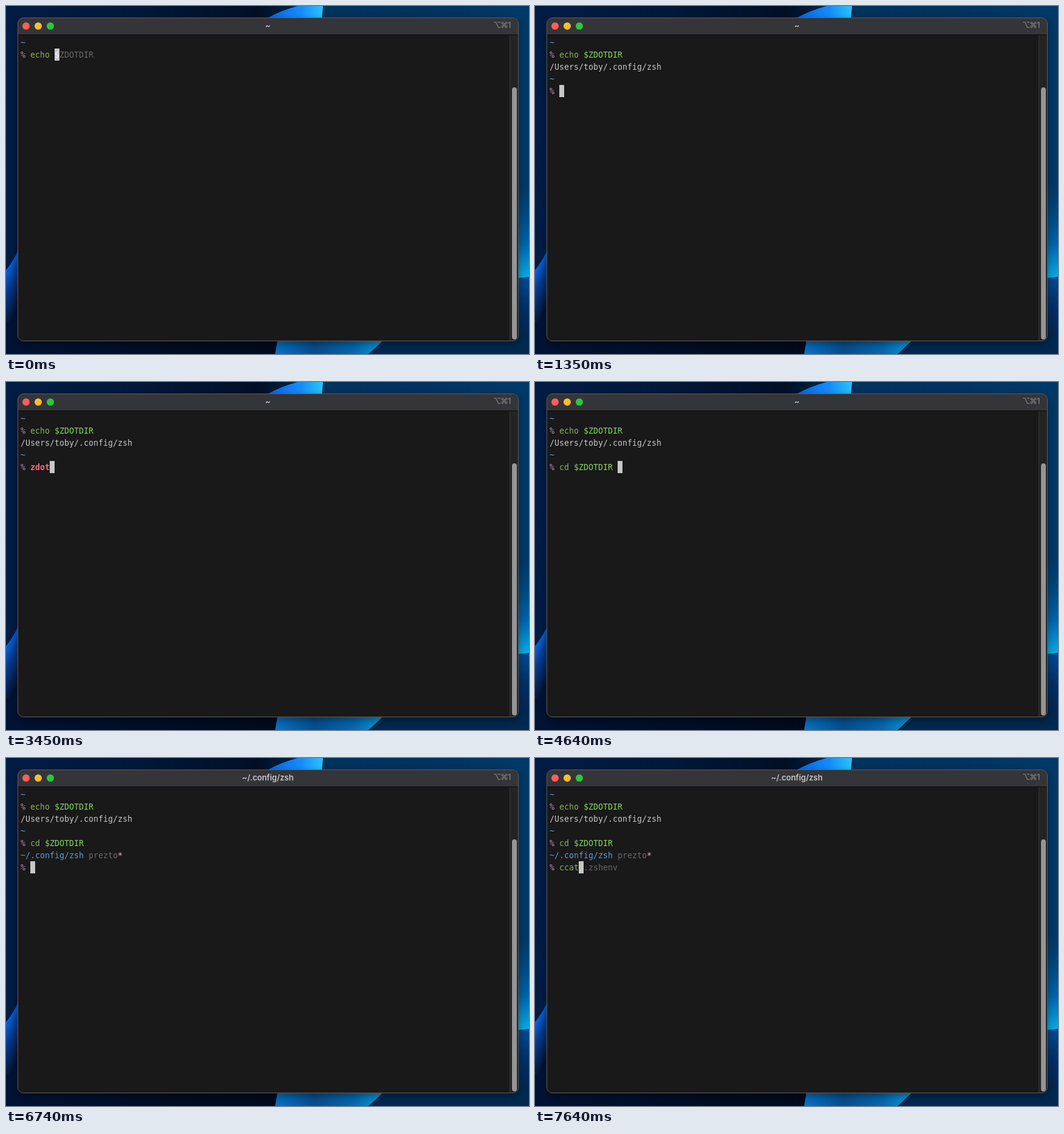
Write an HTML page that moves like this. It is 861 px wide and 573 px high and loops after 8000 ms.

```html
<!DOCTYPE html>
<html lang="en">
<head>
<meta charset="utf-8">
<title>Terminal session</title>
<style>
  html, body { margin: 0; width: 100%; height: 100%; overflow: hidden; background: #011a3c; }
  svg { display: block; width: 861px; height: 573px; }
  text { white-space: pre; }
  #screen { font: 13.29px "DejaVu Sans Mono", "Liberation Mono", monospace; }
  .bar { font: 600 13px Inter, "DejaVu Sans", sans-serif; }
  .path { fill: #5b9bd5; }
  .prompt { fill: #c08fbd; }
  .cmd { fill: #8aae62; }
  .var { fill: #83d75f; }
  .out { fill: #c7c7c7; }
  .hint { fill: #686868; }
  .bad { fill: #ff6b80; font-weight: bold; }
  .star { fill: #ffafd7; }
  .under { fill: #f6f6f6; }
</style>
</head>
<body>
<svg viewBox="0 0 861 573" xmlns="http://www.w3.org/2000/svg">
  <defs>
    <linearGradient id="base">
      <stop offset="0" stop-color="#011c45"/>
      <stop offset=".25" stop-color="#01183a"/>
      <stop offset=".48" stop-color="#000f26"/>
      <stop offset=".61" stop-color="#00325c"/>
      <stop offset=".8" stop-color="#00335f"/>
      <stop offset="1" stop-color="#003968"/>
    </linearGradient>
    <linearGradient id="topPetal">
      <stop offset="0" stop-color="#0a63e6"/>
      <stop offset=".6" stop-color="#148df8"/>
      <stop offset="1" stop-color="#2cc4fb"/>
    </linearGradient>
    <linearGradient id="leftPetal" x1="0" y1="0" x2=".35" y2="1">
      <stop offset="0" stop-color="#1592ff"/>
      <stop offset=".2" stop-color="#0a6cf0"/>
      <stop offset=".5" stop-color="#043f96"/>
      <stop offset="1" stop-color="#00122f"/>
    </linearGradient>
    <linearGradient id="rightPetal" x1="0" y1="0" x2="0" y2="1">
      <stop offset="0" stop-color="#004c86" stop-opacity="0"/>
      <stop offset=".65" stop-color="#0065ad"/>
      <stop offset="1" stop-color="#04aee8"/>
    </linearGradient>
    <linearGradient id="rightLow" x1="0" y1="0" x2="0" y2="1">
      <stop offset="0" stop-color="#014a94"/>
      <stop offset=".4" stop-color="#012f66"/>
      <stop offset="1" stop-color="#012048"/>
    </linearGradient>
    <linearGradient id="bottomPetal">
      <stop offset="0" stop-color="#0872c4"/>
      <stop offset=".35" stop-color="#044f90"/>
      <stop offset=".7" stop-color="#0567ae"/>
      <stop offset="1" stop-color="#0ba5e2"/>
    </linearGradient>
    <linearGradient id="bottomDark">
      <stop offset="0" stop-color="#001334"/>
      <stop offset="1" stop-color="#000a1c"/>
    </linearGradient>
    <filter id="shadow" x="-10%" y="-10%" width="120%" height="125%">
      <feDropShadow dx="0" dy="5" stdDeviation="7" flood-color="#000" flood-opacity=".4"/>
    </filter>
    <clipPath id="frame"><rect x="19.5" y="19.5" width="824" height="532" rx="9.5"/></clipPath>
  </defs>

  <g id="wallpaper">
    <rect width="861" height="573" fill="url(#base)"/>
    <path d="M430 20Q454 7 480 0H522L519 30H430Z" fill="url(#topPetal)"/>
    <path d="M0 435Q10 423 20 403V520H0Z" fill="url(#leftPetal)"/>
    <path d="M843 290H861V446L843 448Z" fill="url(#rightPetal)"/>
    <path d="M843 448L861 446V573H843Z" fill="url(#rightLow)"/>
    <path d="M0 520H20V545H448L443 573H0Z" fill="url(#bottomDark)"/>
    <path d="M448 545H627L597 573H443Z" fill="url(#bottomPetal)"/>
    <path d="M627 545H861V573H597Z" fill="#01284f"/>
  </g>

  <rect x="19" y="19" width="825" height="533" rx="10" fill="#191919" filter="url(#shadow)"/>
  <g clip-path="url(#frame)">
    <rect x="19" y="19" width="825" height="533" fill="#191919"/>
    <rect x="19" y="19" width="825" height="28" fill="#343538"/>
    <rect x="19" y="47" width="825" height="1" fill="#080808"/>
    <rect x="829" y="48" width="15" height="504" fill="#232323"/>
    <rect x="829" y="48" width="1" height="504" fill="#353535"/>
    <rect x="833" y="134" width="8" height="415" rx="4" fill="#959595"/>
  </g>
  <rect x="19.5" y="19.5" width="824" height="532" rx="9.5" fill="none" stroke="#5c5e61"/>

  <circle cx="33" cy="33" r="6" fill="#ff5f57"/>
  <circle cx="53" cy="33" r="6" fill="#febc2e"/>
  <circle cx="73" cy="33" r="6" fill="#28c840"/>
  <circle id="dot" cx="33" cy="33" r="2" fill="#8b1a12"/>
  <text id="title" class="bar" x="431" y="37" text-anchor="middle" fill="#c6c6c7"></text>
  <text class="bar" x="802 814 826" y="36" fill="#77787a">⌥⌘1</text>
  <g id="screen"></g>
</svg>

<script>
const LOOP = 8000, COL = 8, ROW = 20, LEFT = 24, TOP = 50;
const NS = 'http://www.w3.org/2000/svg';
const byId = id => document.getElementById(id);

// A line is a list of [style, text] runs.
const prompt = (...runs) => [['prompt', '% '], ...runs];
const home = [['path', '~']];
const echo = prompt(['cmd', 'echo '], ['var', '$ZDOTDIR']);
const output = [['out', '/Users/toby/.config/zsh']];
const cd = prompt(['cmd', 'cd '], ['var', '$ZDOTDIR']);
const config = [['path', '~/.config/zsh'], ['hint', ' prezto'], ['star', '*']];

const first = [home, echo];
const second = [...first, output, home];
const third = [...second, cd, config];

// Typed text, then the character under the cursor, then the rest of the hint.
const typing = (before, style, typed, hint = '') => ({
  lines: [...before, prompt([style, typed], ['under', hint.slice(0, 1)], ['hint', hint.slice(1)])],
  cursor: [2 + typed.length, before.length]
});
const still = (lines, col, row) => ({ lines, cursor: [col, row] });

const steps = [
  [0, typing([home], 'cmd', 'echo ', '$ZDOTDIR')],
  [750, still(first, 15, 1)],
  [1200, still(first, 0, 2)],
  [1350, typing(second, 'cmd', '')],
  [2850, typing(second, 'bad', 'z', 'z')],
  [3150, typing(second, 'bad', 'zd', 'ot')],
  [3300, typing(second, 'bad', 'zdo', 't')],
  [3450, typing(second, 'bad', 'zdot')],
  [4640, still([...second, cd], 14, 4)],
  [5090, still([...second, cd], 0, 5)],
  [5240, typing(third, 'cmd', '')],
  [6890, typing(third, 'cmd', 'c', 'd $ZDOTDIR')],
  [7040, typing(third, 'cmd', 'cc', 'at .zshenv')],
  [7490, typing(third, 'bad', 'cca', 't .zshenv')],
  [7640, typing(third, 'cmd', 'ccat', ' .zshenv')]
];
const titles = [[0, '~'], [5090, '~/.config/zsh (-zsh)'], [5240, '~/.config/zsh']];
const dots = [[0, 'hidden'], [5990, 'visible'], [6740, 'hidden']];

const at = (table, t) => table.findLast(([start]) => start <= t)[1];

function add(tag, attrs, text = '') {
  const el = document.createElementNS(NS, tag);
  for (const key in attrs) el.setAttribute(key, attrs[key]);
  el.textContent = text;
  byId('screen').append(el);
}

function draw({ lines, cursor: [col, row] }) {
  byId('screen').replaceChildren();
  add('rect', { x: LEFT + col * COL, y: TOP + row * ROW, width: COL, height: ROW, fill: '#c7c7c7' });
  lines.forEach((runs, r) => {
    let c = 0;
    for (const [style, text] of runs) {
      if (text.trim()) add('text', { class: style, x: LEFT + c * COL, y: TOP + r * ROW + 15 }, text);
      c += text.length;
    }
  });
}

let shown;
function tick() {
  const t = performance.now() % LOOP;
  const state = at(steps, t);
  if (state !== shown) draw(shown = state);
  byId('title').textContent = at(titles, t);
  byId('dot').setAttribute('visibility', at(dots, t));
  requestAnimationFrame(tick);
}
tick();
</script>
</body>
</html>
```
